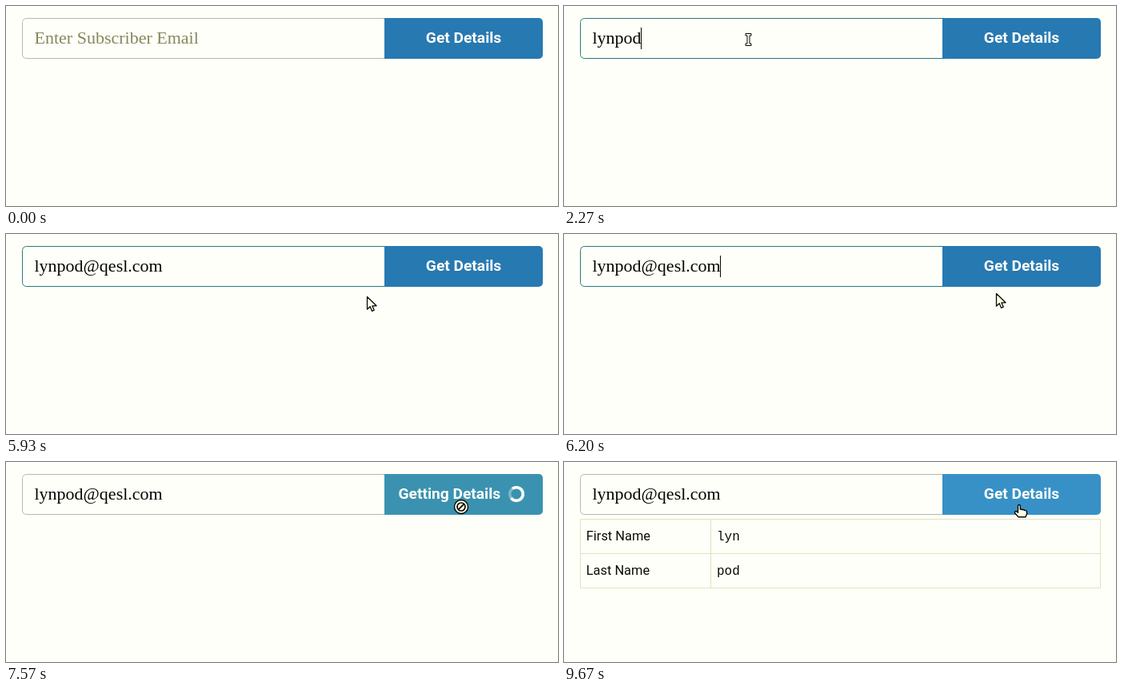
Write an HTML page that moves like this. It is 690 px wide and 250 px high and loops after 9.71 s.

```html
<!DOCTYPE html>
<html lang="en">
<head>
<meta charset="utf-8">
<title>Subscriber lookup</title>
<style>
  html, body { margin: 0; width: 100%; height: 100%; overflow: hidden; background: #fffffa; }
  svg { display: block; width: 690px; height: 250px; }
  .field { font: 22px "Liberation Serif", "Times New Roman", serif; fill: #050500; }
  .placeholder { fill: #87875a; }
  .label { font: 700 19.2px Roboto, sans-serif; fill: #fffffa; }
  .cell { font: 16.4px Roboto, sans-serif; fill: #0c0c04; }
  .value { font: 16px "Liberation Mono", monospace; fill: #0c0c04; }
  .lines { fill: none; stroke: #e2e2bc; }
  .cursor { stroke: #080804; fill: #ffffe6; stroke-linejoin: round; }
</style>
</head>
<body>
<svg viewBox="0 0 690 250">
  <rect id="box" x="20.5" y="15.5" width="460" height="50" rx="5" fill="#fffffa"/>
  <path id="button" d="M473 15H666a5 5 0 0 1 5 5V61a5 5 0 0 1-5 5H473z"/>
  <text id="placeholder" class="field placeholder" x="35.5" y="47">Enter Subscriber Email</text>
  <text id="email" class="field" x="35.5" y="47"></text>
  <rect id="caret" y="27" width="1" height="27" fill="#050500"/>

  <text id="idle" class="label" x="572" y="46" text-anchor="middle">Get Details</text>
  <g id="busy">
    <text class="label" x="490.5" y="46">Getting Details</text>
    <g fill="none" stroke="#fffffa" stroke-width="3.6" transform="translate(638 40)">
      <circle r="8.3" stroke-opacity=".35"/>
      <path id="arc" d="M5.87-5.87A8.3 8.3 0 1 1-5.87-5.87"/>
    </g>
  </g>

  <g id="table">
    <path class="lines" d="M20.5 71.5H670.5V157.5H20.5zM20.5 114.5H670.5M183.5 71.5V157.5"/>
    <text class="cell" x="27.8" y="98">First Name</text>
    <text class="cell" x="27.8" y="141">Last Name</text>
    <text class="value" x="191" y="98">lyn</text>
    <text class="value" x="191" y="141">pod</text>
  </g>

  <g id="pointer" class="cursor">
    <path id="arrow" stroke-width="1.3" d="M.5.5V16.2L4.2 12.8 6.6 18.4 9.2 17.2 6.9 11.8H12z"/>
    <path id="ibeam" d="M-3.5-7.5H3.5V-5H1.5V5H3.5V7.5H-3.5V5H-1.5V-5H-3.5z"/>
    <path id="hand" stroke-width="1.4" d="M-1.5 5.5V-1q0-1.5 1.4-1.5t1.4 1.5V3.2q1.5-.7 2.7.5 1.7-.5 2.6.7 2.6-.2 2.9 1.7V9L8 12.7H-1L-5.2 8q-.9-1.8.5-2.4t3.2 1.7z"/>
    <g id="blocked">
      <circle r="8.5" stroke-width="1.4"/>
      <circle r="5" stroke-width="1.7"/>
      <path d="M-3.4 3.4 3.4-3.4" stroke-width="1.9"/>
    </g>
  </g>
</svg>
<script>
  const LOOP = 9710, FOCUS = 500, CLICK = 6750, RESULT = 8530, BLINK = 530;
  const ADDRESS = "lynpod@qesl.com";
  const KEYS = [1300, 1600, 1670, 1900, 2030, 2270, 2900, 3230, 3330, 3670, 3800, 4070, 4400, 4670, 4970];
  // time, x, y
  const PATH = [
    [30, 330, 140], [150, 300, 110], [300, 258, 68], [450, 235, 47], [600, 230, 42],
    [5650, 230, 42], [5760, 285, 52], [5850, 385, 70], [5930, 451, 78], [6050, 505, 83],
    [6200, 540, 74], [6400, 562, 60], [6630, 569, 56], [LOOP, 569, 56]
  ];
  const el = id => document.getElementById(id);
  const show = (id, on) => el(id).style.display = on ? "" : "none";

  function pointerAt(t) {
    const i = Math.max(1, PATH.findIndex(p => p[0] > t));
    const [t0, x0, y0] = PATH[i - 1], [t1, x1, y1] = PATH[i];
    const k = Math.max(0, (t - t0) / (t1 - t0));
    return [x0 + (x1 - x0) * k, y0 + (y1 - y0) * k];
  }

  function render(t) {
    const typed = KEYS.filter(k => k <= t).length;
    const focused = t >= FOCUS && t < CLICK;
    const busy = t >= CLICK && t < RESULT;
    const [x, y] = pointerAt(t);
    const inside = y > 15 && y < 66;
    const hover = inside && x >= 473;

    el("box").setAttribute("stroke", focused ? "#2a7a78" : "#b8b8aa");
    el("button").setAttribute("fill", busy ? "#3a92b0" : hover ? "#3791c6" : "#2779b2");
    el("email").textContent = ADDRESS.slice(0, typed);
    show("placeholder", !typed);

    const lastInput = typed ? KEYS[typed - 1] : FOCUS;
    show("caret", focused && Math.floor((t - lastInput) / BLINK) % 2 === 0);
    const width = typed ? el("email").getComputedTextLength() : 0;
    el("caret").setAttribute("x", Math.floor(35 + width));

    show("idle", !busy);
    show("busy", busy);
    el("arc").setAttribute("transform", `rotate(${(t - CLICK - 50) * 0.36})`);
    show("table", t >= RESULT);

    const shape = busy ? "blocked" : hover ? "hand" : inside ? "ibeam" : "arrow";
    for (const id of ["arrow", "ibeam", "hand", "blocked"]) show(id, id === shape);
    show("pointer", t >= 30);
    el("pointer").setAttribute("transform", `translate(${Math.round(x) + (shape === "ibeam" ? 0.5 : 0)} ${Math.round(y)})`);
  }

  const start = performance.now();
  function tick() {
    render((performance.now() - start) % LOOP);
    requestAnimationFrame(tick);
  }
  tick();
</script>
</body>
</html>
```
